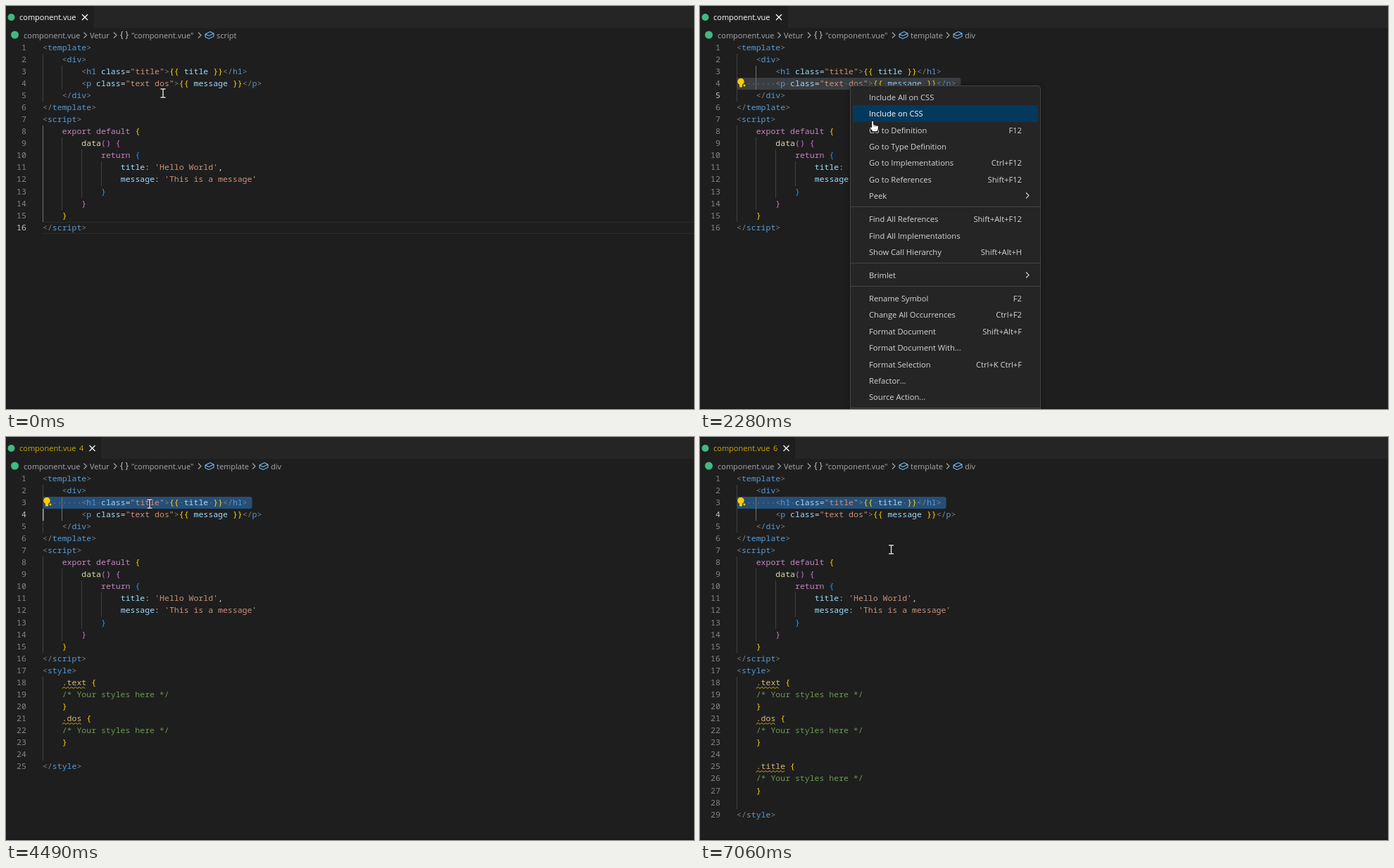
Animation, 977 px wide and 573 px high, one loop 7190 ms. Source, as an HTML page with a canvas:

```html
<!DOCTYPE html>
<html lang="en">
<head>
<meta charset="utf-8">
<title>Editor</title>
<style>
html, body { margin: 0; width: 100%; height: 100%; overflow: hidden; background: #1e1e1e; }
canvas { display: block; width: 977px; height: 573px; }
</style>
</head>
<body>
<canvas id="stage" width="977" height="573"></canvas>
<script>
const ctx = document.getElementById('stage').getContext('2d');
const LOOP = 7190, W = 977, H = 573;
const LEFT = 52, TOP = 50.7, CH = 6.92, LH = 17.07;
const ROW = 23.37, GAP = 9.65;
const MONO = '11.53px "Noto Sans Mono", "DejaVu Sans Mono", monospace';
const ui = size => `${size}px "Open Sans", "Noto Sans", sans-serif`;

// Each segment starts with its colour key.
const COLORS = {
  g: '#808080', t: '#569cd6', a: '#9cdcfe', w: '#d4d4d4', s: '#ce9178', y: '#ffd700',
  k: '#c586c0', f: '#dcdcaa', p: '#da70d6', b: '#179fff', c: '#6a9955', d: '#d7ba7d'
};
const tag = (name, close = '') => `g<${close}|t${name}|g>`;
const rule = name => [`w    |d.${name}|y {`, 'w    |c/* Your styles here */', 'w    |y}'];
const parse = line => line.split('|').map(s => ({ color: COLORS[s[0]], text: s.slice(1) }));
const head = [
  tag('template'),
  'w    |' + tag('div'),
  'w        |g<|th1|a class|w=|s"title"|g>|y{{|a title |y}}|' + tag('h1', '/'),
  'w        |g<|tp|a class|w=|s"text dos"|g>|y{{|a message |y}}|' + tag('p', '/'),
  'w    |' + tag('div', '/'),
  tag('template', '/'),
  tag('script'),
  'w    |kexport default|y {',
  'w        |fdata|p() {',
  'w            |kreturn|b {',
  "w                |atitle:|s 'Hello World'|w,",
  "w                |amessage:|s 'This is a message'",
  'w            |b}',
  'w        |p}',
  'w    |y}',
  tag('script', '/')
];
const oneRule = [...head, tag('style'), ...rule('text'), ...rule('dos'), 'w', tag('style', '/')];
const twoRules = [...oneRule.slice(0, -1), ...rule('title'), 'w', tag('style', '/')];
const docs = [head, oneRule, twoRules].map(doc => doc.map(parse));

const MENU = [
  ['Include All on CSS'], ['Include on CSS'], ['Go to Definition', 'F12'], ['Go to Type Definition'],
  ['Go to Implementations', 'Ctrl+F12'], ['Go to References', 'Shift+F12'], ['Peek', '>'], null,
  ['Find All References', 'Shift+Alt+F12'], ['Find All Implementations'],
  ['Show Call Hierarchy', 'Shift+Alt+H'], null, ['Brimlet', '>'], null,
  ['Rename Symbol', 'F2'], ['Change All Occurrences', 'Ctrl+F2'], ['Format Document', 'Shift+Alt+F'],
  ['Format Document With...'], ['Format Selection', 'Ctrl+K Ctrl+F'], ['Refactor...'],
  ['Source Action...'], null, ['Cut', 'Ctrl+X']
];

const PATH = [
  [0, 223, 124], [270, 223, 124], [520, 214.5, 113.5], [1940, 214.5, 113.5], [2270, 245, 163],
  [2400, 247, 171], [2600, 241, 155], [2880, 241, 155], [3620, 204, 95], [4790, 204, 95],
  [5120, 233, 133], [6460, 233, 133], [6860, 271.5, 160], [LOOP, 271.5, 160]
];
const CLICKS = [
  [720, 850], [920, 1050], [1120, 1310], [1580, 1710], [2600, 2730], [3690, 3880],
  [4020, 4150], [4230, 4420], [4640, 4780], [5390, 5590]
];
const CRUMBS = [
  [0, ['script']], [720, ['template', 'div', 'p.text.dos']], [1380, ['template', 'div']],
  [3880, ['template', 'div', 'h1.title']], [4420, ['template', 'div']]
];
// time, active line, caret column, selection [line, from, to]
const EDITS = [
  [0, 16, -1, null], [720, 4, 23.5, null], [920, 4, 26, [4, 23, 26]], [1120, 5, 0, [4, 0, 46]],
  [3690, 3, 22, null], [4020, 3, 24, [3, 19, 24]], [4230, 4, 0, [3, 0, 43]], [5520, 4, 0, [3, 0, 43]]
];

const latest = (list, t) => list.filter(e => e[0] <= t).pop();
const within = (t, a, b) => t >= a && t < b;
const colX = col => LEFT + col * CH;
const lineY = n => Math.round(TOP + (n - 1) * LH);
const baseY = n => Math.floor(TOP + (n - 1) * LH + 12.5);

function mouseAt(t) {
  const i = Math.max(1, PATH.findIndex(p => p[0] > t));
  const [t0, x0, y0] = PATH[i - 1], [t1, x1, y1] = PATH[i];
  const k = (t - t0) / (t1 - t0);
  return [x0 + (x1 - x0) * k, y0 + (y1 - y0) * k];
}

function rect(x, y, w, h, color, r = 0) {
  ctx.fillStyle = color;
  ctx.beginPath();
  ctx.roundRect(x, y, w, h, r);
  ctx.fill();
}

function disc(x, y, r, color) {
  ctx.fillStyle = color;
  ctx.beginPath();
  ctx.arc(x, y, r, 0, Math.PI * 2);
  ctx.fill();
}

function poly(points, color, width = 1, fill) {
  ctx.beginPath();
  points.forEach(([x, y]) => ctx.lineTo(x, y));
  if (fill) {
    ctx.closePath();
    ctx.fillStyle = fill;
    ctx.fill();
  }
  ctx.strokeStyle = color;
  ctx.lineWidth = width;
  ctx.stroke();
}

function text(str, x, y, color, font, align = 'left') {
  ctx.font = font;
  ctx.fillStyle = color;
  ctx.textAlign = align;
  ctx.fillText(str, x, y);
}

const chevron = (x, y, color) => poly([[x - 2, y - 4], [x + 2, y], [x - 2, y + 4]], color, 1.1);

function cube(x, y) {
  const c = '#75beff';
  poly([[x - 6, y - 1.5], [x + 1, y - 5], [x + 6, y - 2.5], [x + 6, y + 1.7],
    [x - 1, y + 5], [x - 6, y + 2.5], [x - 6, y - 1.5]], c, 1.1);
  poly([[x - 6, y - 1.5], [x - 1, y + 1], [x + 6, y - 2.5]], c, 1.1);
}

function drawTab(problems) {
  rect(0, 0, W, 31, '#252526');
  rect(0, 0, problems ? 135 : 125, 31, '#1e1e1e');
  const color = problems ? '#cca700' : '#ffffff';
  disc(7.5, 16, 5, '#41b883');
  text('component.vue', 19, 20, color, ui(11));
  if (problems) text(problems, 104, 20, color, ui(11));
  const x = problems ? 122.5 : 112;
  poly([[x - 4, 12], [x + 4, 20]], '#fff', 1.2);
  poly([[x + 4, 12], [x - 4, 20]], '#fff', 1.2);
}

function drawCrumbs(names) {
  const c = '#a9a9a9', font = ui(11);
  disc(12.5, 41, 5.5, '#41b883');
  text('component.vue', 25, 46, c, font);
  text('Vetur', 119, 46, c, font);
  text('{', 162, 45, '#cccccc', ui(12));
  text('}', 169.5, 45, '#cccccc', ui(12));
  text('"component.vue"', 178, 46, c, font);
  [112.5, 155, 275].forEach(x => chevron(x, 41.5, c));
  const starts = [289, 366, 413];
  names.forEach((name, i) => {
    if (i) chevron(starts[i] - 14, 41.5, c);
    cube(starts[i], 41.5);
    text(name, starts[i] + 10, 46, c, font);
  });
}

function guide(col, from, to, active) {
  const y = lineY(from);
  rect(Math.floor(colX(col)), y, 1, lineY(to + 1) - y, active ? '#707070' : '#404040');
}

function drawGuides(count, inScript) {
  guide(0, 2, 5);
  guide(4, 3, 4, !inScript);
  guide(0, 8, 15, inScript);
  guide(4, 9, 14);
  guide(8, 10, 13);
  guide(12, 11, 12);
  if (count > 16) guide(0, 18, count - 1);
}

function squiggle(line, len) {
  const y = lineY(line) + 15.5, pts = [];
  for (let x = colX(4), i = 0; x <= colX(4 + len); x += 2.7, i++) pts.push([x, y + (i % 2 ? -1 : 1)]);
  poly(pts, '#cca700', 1);
}

function drawBulb(line) {
  const y = lineY(line) + 5.5;
  disc(58, y, 4.7, '#ffcc00');
  rect(56, y + 3, 4, 5, '#ffcc00', 1);
  poly([[63, y + 2.5], [64, y + 4.5], [66, y + 5.5], [64, y + 6.5], [63, y + 8.5],
    [62, y + 6.5], [60, y + 5.5], [62, y + 4.5]], '#1e1e1e', 0.5, '#ffcc00');
}

function drawDots(segments, [line, from, to]) {
  const str = segments.map(s => s.text).join('');
  for (let i = from; i < Math.min(to, str.length); i++) {
    if (str[i] === ' ') disc(colX(i + 0.5), lineY(line) + 8.7, 0.8, 'rgba(255,255,255,.27)');
  }
}

function drawEditor(t, blurred) {
  const doc = docs[t < 2730 ? 0 : t < 5520 ? 1 : 2];
  const [since, active, caret, sel] = latest(EDITS, t);

  if (!sel) {
    rect(LEFT, lineY(active), W - LEFT, 1, '#2b2b2b');
    rect(LEFT, lineY(active + 1) - 1, W - LEFT, 1, '#2b2b2b');
  } else {
    const [line, from, to] = sel;
    rect(colX(from), lineY(line), (to - from) * CH, 17, blurred ? '#3a3d41' : '#264f78', 3);
  }
  if (within(t, 4090, 4230)) {
    rect(colX(29), lineY(3), 5 * CH, 17, '#3c4043');
    rect(colX(16), lineY(11), 5 * CH, 17, '#3c4043');
  }
  drawGuides(doc.length, active === 16);

  doc.forEach((segments, i) => {
    const n = i + 1;
    text(n, 28.8, baseY(n), n === active ? '#c6c6c6' : '#858585', MONO, 'right');
    let col = 0;
    for (const { color, text: str } of segments) {
      text(str, colX(col), baseY(n), color, MONO);
      col += str.length;
    }
  });
  if (sel) drawDots(doc[sel[0] - 1], sel);

  if (t >= 3160) {
    squiggle(18, 5);
    squiggle(21, 4);
  }
  if (t >= 5790) squiggle(25, 6);
  if (t >= 850) drawBulb(t < 3880 ? 4 : 3);

  const start = t >= 5520 ? 5560 : within(t, 2730, 3690) ? 2730 : since;
  const lit = t < start || Math.floor((t - start) / 500) % 2 === 0;
  if (caret >= 0 && !blurred && lit) rect(colX(caret), lineY(active), 1.5, 17, '#aeafad');
}

function drawMenu(x, y, mx, my) {
  ctx.save();
  ctx.shadowColor = 'rgba(0,0,0,.4)';
  ctx.shadowBlur = 7;
  rect(x, y, 271, 620, '#454545', 5);
  ctx.restore();
  rect(x + 1, y + 1, 269, 618, '#252526', 4);

  let cy = y + 17, hover = false;
  for (const item of MENU) {
    if (!item) {
      rect(x + 1, Math.floor(cy - 8), 269, 1, '#454545');
      cy += GAP;
      continue;
    }
    const mid = Math.round(cy);
    const on = mx > x + 4 && within(my, cy - ROW / 2, cy + ROW / 2);
    if (on) {
      hover = true;
      rect(x + 4, mid - 12, 263, 24, '#04395e', 3);
    }
    const color = on ? '#ffffff' : '#d6d6d6', [label, key] = item;
    text(label, x + 27, mid + 4, color, ui(11.17));
    if (key === '>') chevron(x + 252, mid - 0.5, color);
    else if (key) text(key, x + 244, mid + 4, color, ui(11.17), 'right');
    cy += ROW;
  }
  return hover;
}

function iBeam() {
  for (const [color, width] of [['#111', 3], ['#fff', 1.3]]) {
    poly([[0, -5.5], [0, 5.5]], color, width);
    for (const y of [-6, 6]) poly([[-3.5, y], [3.5, y]], color, width);
  }
}

function hand() {
  poly([[-1.5, 0.5], [0, -0.5], [1.5, 0.5], [1.5, 5], [7, 6.2], [8.3, 7.5], [8, 11.5], [6.5, 15],
    [0, 15], [-4, 9.5], [-4, 7.7], [-1.5, 9]], '#111', 1, '#fff');
  for (const x of [1.7, 3.7, 5.7]) poly([[x, 6], [x, 8]], '#333', 0.7);
}

function arrow() {
  poly([[0, 0], [0, 13], [3, 10.3], [5, 15], [7, 14], [5, 9.7], [9, 9.3]], '#111', 1, '#fff');
}

function draw(t) {
  const [mx, my] = mouseAt(t);
  const menu = within(t, 1710, 2730) ? [213, 113] : within(t, 4780, 5520) ? [202, 95] : null;
  rect(0, 0, W, H, '#1e1e1e');
  drawTab(t < 3160 ? '' : t < 5790 ? '4' : '6');
  drawCrumbs(latest(CRUMBS, t)[1]);
  drawEditor(t, menu || within(t, 4710, 4780));
  rect(0, 571.5, W, 1.5, '#181818');
  const hover = menu && drawMenu(...menu, mx, my);
  if (CLICKS.some(([a, b]) => within(t, a, b))) disc(mx, my, 10.7, 'rgba(230,220,0,.64)');
  ctx.save();
  ctx.translate(mx, my);
  (menu ? hover ? hand : arrow : iBeam)();
  ctx.restore();
}

const began = performance.now();
function tick() {
  draw((performance.now() - began) % LOOP);
  requestAnimationFrame(tick);
}
tick();
</script>
</body>
</html>
```
